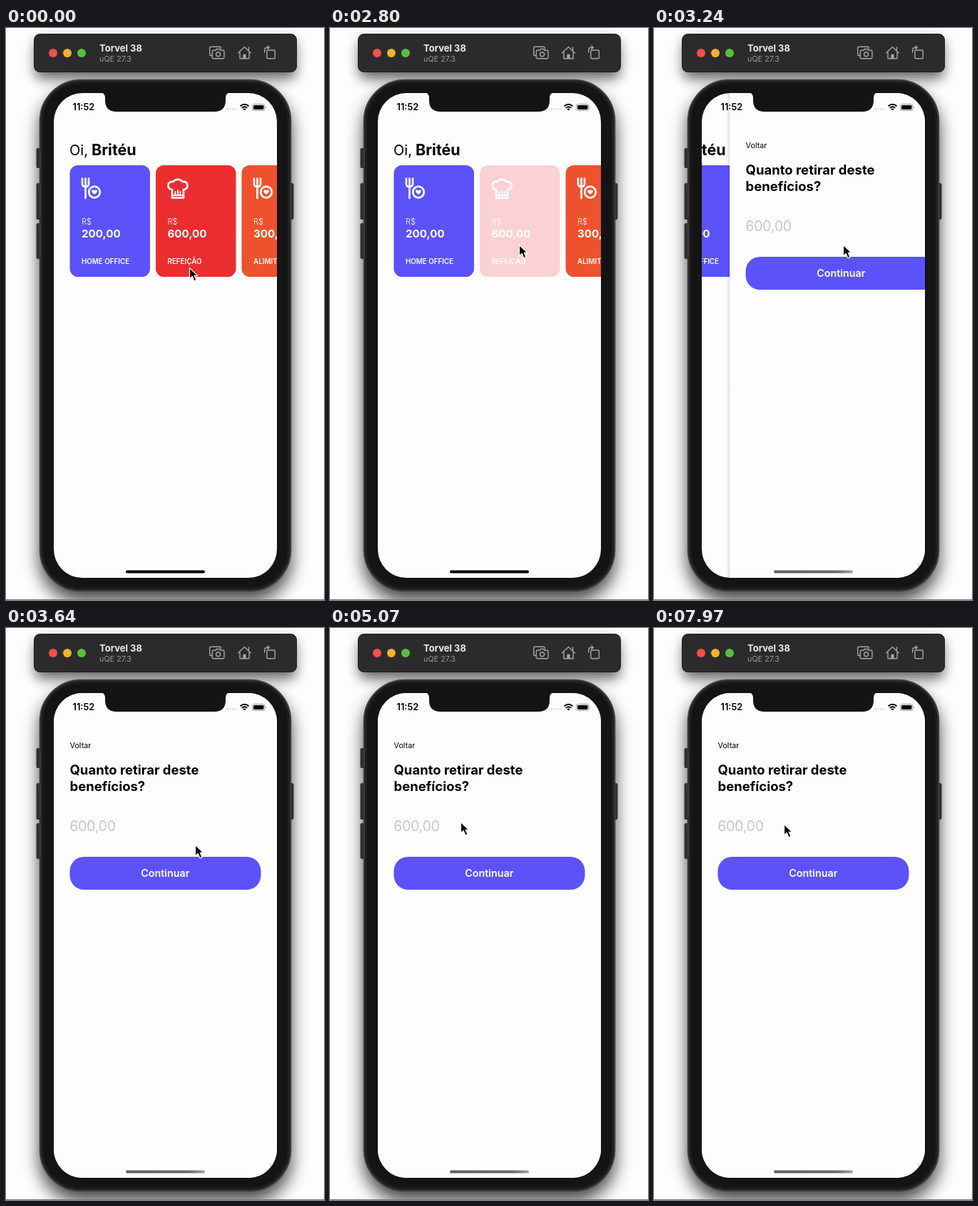
These frames come from a looping animation (446 by 800 pixels, 7.99 s). An HTML page:

```html
<!DOCTYPE html>
<html lang="pt-BR">
<head>
<meta charset="utf-8">
<title>Benefícios</title>
<style>
  html, body { margin: 0; width: 100%; height: 100%; overflow: hidden; background: #fdfdfd; }
  svg { display: block; font-family: Inter, Roboto, sans-serif; }
  .bold { font-weight: 700; }
  .semi { font-weight: 600; }
  .light { font-weight: 300; }
  .tool { fill: none; stroke: #a6a6a8; stroke-width: 1.4; stroke-linejoin: round; stroke-linecap: round; }
  .icon { fill: none; stroke: #fff; stroke-width: 2.7; stroke-linejoin: round; stroke-linecap: round; }
</style>
</head>
<body>
<svg width="446" height="800" viewBox="0 0 446 800">
  <defs>
    <filter id="soft" x="-30%" y="-80%" width="160%" height="260%"><feGaussianBlur stdDeviation="9"/></filter>
    <filter id="wide" x="-30%" y="-30%" width="160%" height="160%"><feGaussianBlur stdDeviation="12"/></filter>
    <clipPath id="screen"><rect x="67" y="91" width="313" height="678" rx="40"/></clipPath>
    <linearGradient id="edge">
      <stop offset="0" stop-color="#000" stop-opacity="0"/>
      <stop offset="1" stop-color="#000" stop-opacity=".12"/>
    </linearGradient>
    <linearGradient id="pill">
      <stop offset="0" stop-color="#606060"/>
      <stop offset=".8" stop-color="#6a6a6a"/>
      <stop offset="1" stop-color="#a4a4a4"/>
    </linearGradient>
    <g id="meal" class="icon">
      <path d="M1.500 1.500V9Q1.500 13 6 13T10.500 9V1.500M6 1.500V29"/>
      <circle cx="18.500" cy="20.500" r="7.800"/>
      <path d="M18.500 24.300L14.900 20.600Q14 17.400 16.700 17.300L18.500 18.600L20.300 17.300Q23 17.400 22.100 20.600Z" fill="#fff" stroke="none"/>
    </g>
    <g id="hat" class="icon">
      <path d="M7 17A5.600 5.600 0 1 1 8.500 6A7.500 6.500 0 0 1 21.500 6A5.600 5.600 0 1 1 23 17V28.500H7Z"/>
      <path d="M7 25H23M11.500 20V24M15 18V24M18.500 20V24" stroke-width="2"/>
    </g>
  </defs>

  <rect width="446" height="800" fill="#fdfdfd"/>
  <rect x="41" y="18" width="365" height="53" rx="8" filter="url(#soft)" opacity=".6"/>
  <rect x="47" y="86" width="353" height="716" rx="58" filter="url(#wide)" opacity=".72"/>
  <rect y="799" width="446" height="1" fill="#777"/>

  <rect x="39.500" y="8.500" width="368" height="53" rx="8" fill="#2b2b2d" stroke="#1b1b1c"/>
  <circle cx="66" cy="35" r="6" fill="#f4504a"/>
  <circle cx="86" cy="35" r="6" fill="#f3b22e"/>
  <circle cx="106" cy="35" r="6" fill="#57bf3f"/>
  <text x="131" y="33" font-size="13" class="bold" fill="#ececec">Torvel 38</text>
  <text x="131" y="47" font-size="10.800" fill="#98989a">uQE 27.3</text>
  <g class="tool">
    <path d="M288.500 38.500H287.500Q285.700 38.500 285.700 36.700V28Q285.700 26.200 287.500 26.200H299.500Q301.300 26.200 301.300 28V28.500"/>
    <path d="M291 31.300H294L295.300 29.500H300L301.300 31.300H304.300Q306 31.300 306 33V41Q306 42.700 304.300 42.700H291Q289.300 42.700 289.300 41V33Q289.300 31.300 291 31.300Z"/>
    <circle cx="297.600" cy="36.700" r="3"/>
    <path d="M325.500 35L334.500 26.500L343.500 35M328 33.500V42.700H341V33.500M340.500 27V31"/>
    <path d="M333 42.500V37.500H336V42.500" fill="#a6a6a8"/>
    <rect x="365.800" y="31" width="11.500" height="11.700" rx="1.800"/>
    <path d="M362.700 34V31Q362.700 27.300 366.500 27.300H369M366.800 25L369.300 27.300L366.800 29.600"/>
  </g>

  <g fill="#303030">
    <rect x="42.500" y="168" width="6" height="28" rx="2"/>
    <rect x="42.500" y="217" width="6" height="51" rx="2"/>
    <rect x="42.500" y="273" width="6" height="50" rx="2"/>
    <rect x="397" y="217" width="6.500" height="51" rx="2"/>
  </g>
  <rect x="48" y="73" width="351" height="714" rx="57" fill="#141414" stroke="#3a3a3a" stroke-width="2.500"/>
  <rect x="51" y="76" width="345" height="708" rx="54" fill="none" stroke="#202020" stroke-width="2"/>

  <g clip-path="url(#screen)">
    <rect x="67" y="91" width="313" height="678" fill="#fdfdfd"/>
    <g id="home">
      <text x="89" y="178" font-size="20">Oi,</text>
      <text x="120" y="178" font-size="21.500" class="bold">Britéu</text>
      <g id="cards"></g>
    </g>
    <g id="detail">
      <rect x="62" y="91" width="5" height="678" fill="url(#edge)"/>
      <rect x="67" y="91" width="313" height="678" fill="#fdfdfd"/>
      <text x="89.500" y="167.500" font-size="10.800">Voltar</text>
      <g class="bold" font-size="18.500">
        <text x="89.500" y="205">Quanto retirar deste</text>
        <text x="89.500" y="228">benefícios?</text>
      </g>
      <text x="89.500" y="283.500" font-size="19.500" class="light" fill="#b8b8ba">600,00</text>
      <rect x="89.500" y="320" width="268" height="46" rx="20" fill="#5b52f9"/>
      <text x="223.300" y="348.300" font-size="14.300" class="semi" fill="#fff" text-anchor="middle">Continuar</text>
    </g>
  </g>

  <path d="M131 90Q139 90 139 98V101Q139 117 155 117H292Q308 117 308 101V98Q308 90 316 90Z" fill="#141414"/>
  <text x="93.500" y="115.300" font-size="12.800" class="semi">11:52</text>
  <g fill="#c6c6c6">
    <circle cx="311" cy="113.500" r="1"/><circle cx="314.800" cy="113.500" r="1"/>
    <circle cx="318.600" cy="113.500" r="1"/><circle cx="322.400" cy="113.500" r="1"/>
  </g>
  <g fill="none" stroke="#000" stroke-width="1.900">
    <path d="M328.500 109.300Q334.500 104.300 340.500 109.300M330.700 111.800Q334.500 108.700 338.300 111.800"/>
    <path d="M332.300 113.200Q334.500 111.600 336.700 113.200L334.500 115.600Z" fill="#000" stroke="none"/>
  </g>
  <rect x="345.500" y="106.500" width="17.500" height="9" rx="2.700" fill="none" stroke="#999"/>
  <rect x="347" y="108" width="14.500" height="6" rx="1.400"/>
  <path d="M364 109.500Q365.800 111 364 112.700Z" fill="#999"/>
  <rect id="bar" x="168" y="758.500" width="111" height="4" rx="2"/>

  <path id="cursor" d="M0 0V15.300L3.700 12L6.500 18.400L9.500 17.100L6.800 10.900H11.300Z" stroke="#fff" stroke-width="1.200" stroke-linejoin="round"/>
</svg>
<script>
  const LOOP = 7990;
  const WIDTH = 313;
  const RED = [236, 45, 48];
  const FADED = [251, 209, 211];
  const el = id => document.getElementById(id);

  const card = (x, color, icon, value, label) => `
    <g transform="translate(${x} 192)" fill="#fff">
      <rect width="112.5" height="156" rx="11.5" fill="${color}"/>
      <use href="#${icon}" x="16" y="17"/>
      <text x="16.500" y="83" font-size="11" class="light">R$</text>
      <text x="16.500" y="101" font-size="15.200" class="bold">${value}</text>
      <text x="16.500" y="138" font-size="9.800" class="semi">${label}</text>
    </g>`;
  el('cards').innerHTML =
    card(89.5, '#5b52f9', 'meal', '200,00', 'HOME OFFICE') +
    card(210, `rgb(${RED})`, 'hat', '600,00', 'REFEIÇÃO') +
    card(330.5, '#ee512d', 'meal', '300,00', 'ALIMITAÇÃO');
  const pressed = el('cards').children[1].firstElementChild;

  const mix = (a, b, p) => a + (b - a) * p;
  const ease = (t, from, to) => {
    const p = Math.min(1, Math.max(0, (t - from) / (to - from)));
    return p * p * (3 - 2 * p);
  };

  function poseTime(t) {
    const s = t > 3700 ? t - 10 : t;
    const r = s % 140;
    const step = r < 20 ? 0 : r < 120 ? 1 : 2;
    return (Math.floor(s / 140) * 3 + step) * 140 / 3;
  }

  // Critically damped spring: share of the push still to go.
  function pushLeft(t) {
    const x = Math.max(0, t - 3069) * Math.sqrt(1000 / 3) / 1000;
    const left = (1 + x) * Math.exp(-x);
    return left < .002 ? 0 : left;
  }

  function draw(t) {
    const v = poseTime(t);
    const left = pushLeft(v);
    const press = ease(v, 2600, 2750) - ease(v, 2930, 3180);
    const up = ease(v, 40, 600);
    const aside = ease(v, 4240, 4950);
    const settle = ease(v, 5850, 6000);

    const tint = RED.map((c, i) => Math.round(mix(c, FADED[i], press)));
    pressed.setAttribute('fill', `rgb(${tint})`);
    el('home').setAttribute('transform', `translate(${-.3 * WIDTH * (1 - left)} 0)`);
    el('detail').setAttribute('transform', `translate(${WIDTH * left} 0)`);
    el('detail').style.display = left < 1 ? '' : 'none';
    el('bar').setAttribute('fill', left < 1 ? 'url(#pill)' : '#000');

    const x = mix(mix(257.5, 265.5, up), 183.5, aside) - ease(v, 6700, 7300);
    const y = mix(mix(335.5, 303.5, up), 271.5, aside) + 3 * settle;
    el('cursor').setAttribute('transform', `translate(${x} ${y})`);
  }

  function tick() {
    draw(performance.now() % LOOP);
    requestAnimationFrame(tick);
  }
  tick();
</script>
</body>
</html>
```
